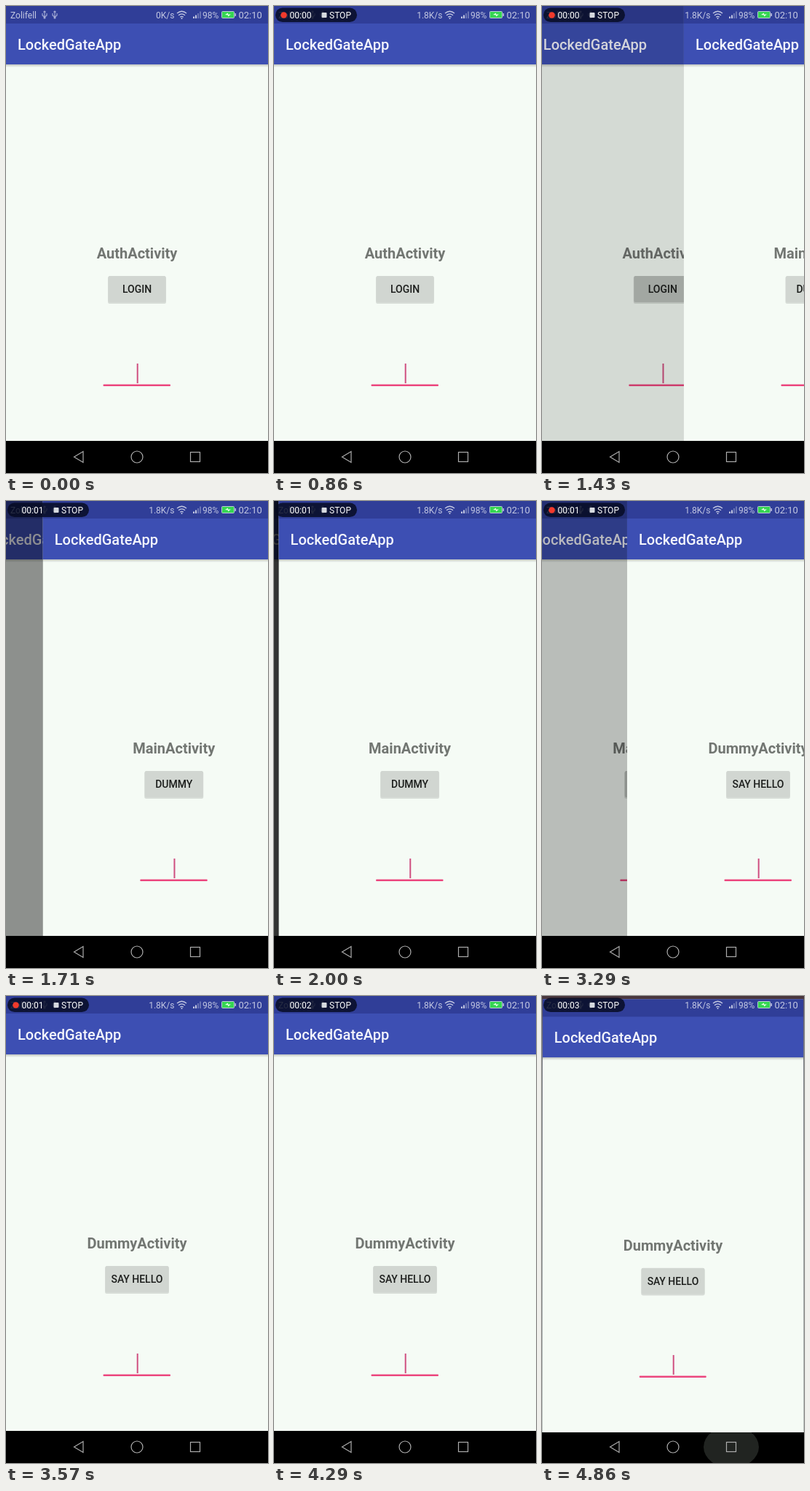
Write an HTML page that moves like this. It is 360 by 640 pixels and loops after 5.01 s.

```html
<!DOCTYPE html>
<html lang="en">
<head>
<meta charset="utf-8">
<title>Activity transitions</title>
<style>
  html, body { margin: 0; width: 100%; height: 100%; overflow: hidden; background: #000; }
  svg { display: block; width: 100vw; height: 100vh; font-family: Roboto, "Noto Sans", sans-serif; }
  .title { font-size: 20px; font-weight: 500; fill: #f4f5fc; }
  .label { font-size: 20px; font-weight: 700; fill: #727672; text-anchor: middle; }
  .caption { font-size: 14px; font-weight: 500; fill: #1c1e1c; text-anchor: middle; }
  .status { font-size: 12px; fill: #c3c8e2; }
  .pill { font-size: 12px; fill: #fff; }
</style>
</head>
<body>
<svg viewBox="0 0 360 640" preserveAspectRatio="none">
  <defs>
    <linearGradient id="barShadow" x2="0" y2="1">
      <stop offset="0" stop-color="#000" stop-opacity=".22"/>
      <stop offset="1" stop-color="#000" stop-opacity="0"/>
    </linearGradient>
    <linearGradient id="backdrop" x2="0" y2="1">
      <stop offset="0" stop-color="#49363c"/>
      <stop offset=".15" stop-color="#70747c"/>
      <stop offset="1" stop-color="#c0c7c3"/>
    </linearGradient>
    <clipPath id="navClip"><rect y="598" width="360" height="42"/></clipPath>
    <g id="usb" fill="none" stroke="#aab1d8" stroke-width="1.1">
      <path d="M0 -5V5M-3 -2V1L0 3L3 1V-2M-1.5 -3.5L0 -5L1.5 -3.5"/>
      <circle cy="4" r="1"/>
    </g>
  </defs>
  <rect width="360" height="640" fill="url(#backdrop)"/>
  <g id="pages"></g>

  <g class="status">
    <text x="6" y="17">Zolifell</text>
    <use href="#usb" x="53" y="12"/>
    <use href="#usb" x="67" y="12"/>
    <text id="speed" x="231.5" y="17" text-anchor="end"></text>
    <path d="M235 10Q241.500 4.500 248 10M237 12.700Q241.500 9 246 12.700M239.300 15.200Q241.500 13.500 243.700 15.200"
      fill="none" stroke="#c3c8e2" stroke-width="1.4"/>
    <circle cx="241.500" cy="17" r="1"/>
    <path d="M257 17V14.500H259V17ZM260 17V12.500H262V17Z"/>
    <path d="M263 17V10H265V17ZM266 17V7.500H268V17Z" opacity=".4"/>
    <text x="270" y="16.500">98%</text>
    <rect x="296.500" y="7.500" width="17" height="9" rx="1" fill="#35d652" stroke="#b9c9d6"/>
    <path d="M301 12L305 9.500V11.500H309L305 14.500V12.500Z" fill="#e8ffe9"/>
    <rect x="314.500" y="10" width="1.500" height="4"/>
    <text x="319.500" y="17" font-size="13">02:10</text>
  </g>

  <g id="recorder" class="pill">
    <rect x="2" y="2.500" width="112" height="19.500" rx="9.750" fill="#050a20" opacity=".82"/>
    <circle id="recordDot" cx="13.500" cy="12.500" r="4.300" fill="#f23a2c"/>
    <text id="clock" x="21.500" y="17"></text>
    <rect x="65.500" y="9" width="7" height="7" rx="1" fill="#d6d9df"/>
    <text x="76" y="17">STOP</text>
  </g>

  <rect id="navBar" width="360" height="44"/>
  <ellipse id="navPress" cx="260" cy="618" ry="29" fill="#212421" clip-path="url(#navClip)"/>
  <g fill="none" stroke="#acacac" stroke-width="1.2">
    <path d="M93.500 618L106 610.500V625.500Z"/>
    <circle cx="180" cy="618" r="8"/>
    <rect x="253.500" y="611.500" width="13" height="13"/>
  </g>
</svg>
<script>
const LOOP = 5010, RATE = 7, LAST_STEP = 34;
const byId = id => document.getElementById(id);
const show = (node, on) => node.setAttribute("visibility", on ? "inherit" : "hidden");
const within = (v, from, to) => v >= from && v <= to;

function makePage(label, caption, buttonWidth) {
  const left = 180 - buttonWidth / 2;
  const g = document.createElementNS("http://www.w3.org/2000/svg", "g");
  g.innerHTML = `
    <rect width="360" height="640" fill="#f5fbf5"/>
    <rect width="360" height="80" fill="#3d4fb3"/>
    <rect width="360" height="24" fill="#303e98"/>
    <rect y="80" width="360" height="4" fill="url(#barShadow)"/>
    <text class="title" x="16" y="60">LockedGateApp</text>
    <text class="label" x="180" y="346">${label}</text>
    <rect x="${left - .5}" y="370.5" width="${buttonWidth + 1}" height="37.5" rx="2.5" opacity=".12"/>
    <rect class="button" x="${left}" y="370" width="${buttonWidth}" height="36" rx="2"/>
    <circle class="touch" cx="184" cy="383" r="11" fill="#fff" opacity=".2"/>
    <text class="caption" x="180" y="393">${caption}</text>
    <rect class="cursor" x="179.7" y="490" width="2" height="27" fill="#cf4f80"/>
    <rect x="133.5" y="518.5" width="92.5" height="2.6" rx="1" fill="#ec467e"/>
    <rect class="dim" width="360" height="640" opacity="0"/>`;
  byId("pages").append(g);
  const part = name => g.querySelector("." + name);
  return { g, button: part("button"), touch: part("touch"), cursor: part("cursor"), dim: part("dim") };
}

const auth = makePage("AuthActivity", "LOGIN", 79);
const main = makePage("MainActivity", "DUMMY", 80);
const dummy = makePage("DummyActivity", "SAY HELLO", 87);

// Piecewise linear progress through [step, value] points.
function along(points, v) {
  if (v <= points[0][0]) return points[0][1];
  for (let i = 1; i < points.length; i++) {
    const [a, from] = points[i - 1], [b, to] = points[i];
    if (v <= b) return from + (to - from) * (v - a) / (b - a);
  }
  return points[points.length - 1][1];
}

const offset = (page, x) => page.g.setAttribute("transform", `translate(${x} 0)`);

// The new page decelerates in while the old one drifts left and darkens.
function slide(from, to, p) {
  const dim = Math.min(1, p * (.85 + .65 * p));
  show(from.g, p < 1);
  show(to.g, p > 0);
  from.dim.setAttribute("opacity", dim);
  offset(from, -106 * dim);
  offset(to, 360 * (1 - p) ** 4);
}

function press(page, on, touching) {
  page.button.setAttribute("fill", on ? "#bbc0bb" : "#d1d6d1");
  show(page.touch, touching);
}

function draw(time) {
  const step = Math.min(LAST_STEP, Math.floor((time % LOOP + 5) * RATE / 1000));
  const recording = step >= 1;

  const first = along([[8.84, 0], [17, 1]], step);
  const second = along([[20.9, 0], [23, .245], [25, 1]], step);
  slide(auth, main, first);
  if (second > 0) slide(main, dummy, second);
  else {
    main.dim.setAttribute("opacity", 0);
    show(dummy.g, false);
  }

  press(auth, within(step, 7, 17), false);
  press(main, step >= 19, within(step, 19, 21));
  press(dummy, false, false);
  show(main.cursor, step < 18);
  show(dummy.cursor, !within(step, 27, 28) && !within(step, 31, 32));

  show(byId("recorder"), recording);
  show(byId("recordDot"), recording && !within(step, 12, 18) && step < 30);
  byId("speed").textContent = recording ? "1.8K/s" : "0K/s";
  const seconds = step < 12 ? 0 : step < 29 ? 1 : step < 33 ? 2 : 3;
  byId("clock").textContent = "00:0" + seconds;

  const leaving = step === LAST_STEP;
  byId("pages").setAttribute("transform", leaving ? "translate(.9 4.5) scale(.995)" : "");
  byId("navBar").setAttribute("y", leaving ? 598 : 596);
  show(byId("navPress"), step >= 32);
  byId("navPress").setAttribute("rx", Math.max(0, 38 - (LAST_STEP - step) * 9));
}

function tick() {
  draw(performance.now());
  requestAnimationFrame(tick);
}
tick();
</script>
</body>
</html>
```
